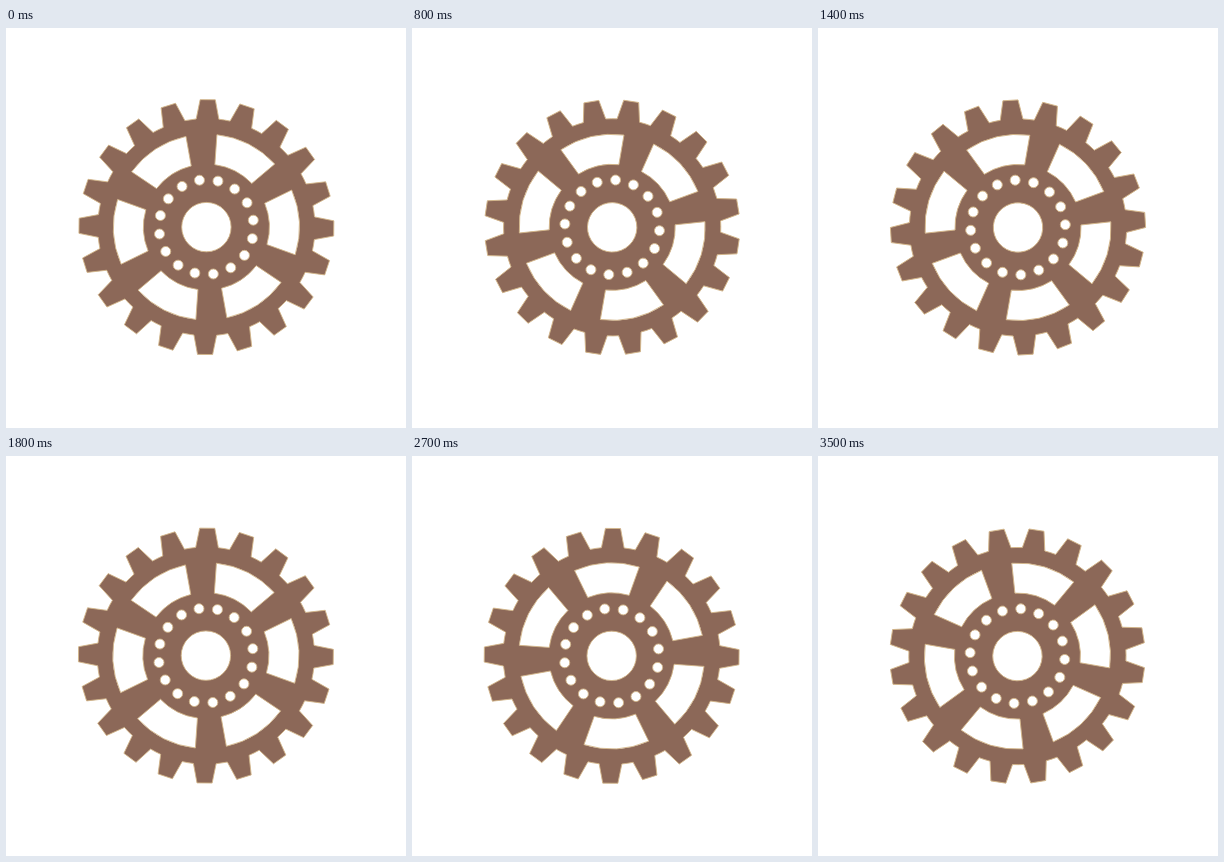
These frames come from a looping animation (400x400 px, 3.6 s). An HTML page:

```html
<!DOCTYPE html>
<html lang="en">
<head>
<meta charset="utf-8">
<title>Turning gear</title>
<style>
  html, body { margin: 0; width: 100%; height: 100%; overflow: hidden; background: #fff; }
  svg { display: block; width: 100vw; height: 100vh; }
</style>
</head>
<body>
<svg viewBox="0 0 400 400">
  <path id="gear" fill="#8c6858" fill-rule="evenodd" stroke="#d3b68a" stroke-width="0.9" stroke-linejoin="round"/>
</svg>
<script>
const LOOP = 3600, STEP = 100, STEPS = LOOP / STEP;
const TEETH = 20, SPOKES = 6, DOTS = 16;
const gear = document.getElementById('gear');

// Angles are in degrees, clockwise from the top.
function polar(radius, angle) {
  const a = angle * Math.PI / 180;
  return [radius * Math.sin(a), -radius * Math.cos(a)];
}
const point = (radius, angle) => polar(radius, angle).map(v => v.toFixed(2)).join(' ');

function arc(radius, angle, sweep) {
  return `A${radius} ${radius} 0 0 ${sweep} ${point(radius, angle)}`;
}

function circle(radius, x = 0, y = 0) {
  return `M${x - radius} ${y}a${radius} ${radius} 0 1 0 ${2 * radius} 0` +
    `a${radius} ${radius} 0 1 0 ${-2 * radius} 0Z`;
}

function repeat(count, offset, draw) {
  return Array.from({ length: count }, (_, i) => draw(offset + i * 360 / count)).join('');
}

function rim() {
  const root = 108.6, tip = 127.6, rootHalf = 6, tipHalf = 3.4, offset = 0.6;
  const teeth = repeat(TEETH, offset, a =>
    arc(root, a - rootHalf, 1) +
    `L${point(tip, a - tipHalf)}L${point(tip, a + tipHalf)}L${point(root, a + rootHalf)}`);
  return `M${point(root, offset - rootHalf)}${teeth}Z`;
}

function windowHole(angle) {
  const outer = 93, inner = 63, outerHalf = 20.4, innerHalf = 19.2;
  return `M${point(outer, angle - outerHalf)}${arc(outer, angle + outerHalf, 1)}` +
    `L${point(inner, angle + innerHalf)}${arc(inner, angle - innerHalf, 0)}Z`;
}

gear.setAttribute('d',
  rim() +
  repeat(SPOKES, 26.9, windowHole) +
  repeat(DOTS, -8.4, a => circle(5, ...polar(47.4, a))) +
  circle(24.7));

// The axle drifts slightly down and left over a turn.
function render(time) {
  const step = Math.floor((time % LOOP) / STEP);
  const turn = step / STEPS;
  gear.setAttribute('transform',
    `translate(${200.4 - turn} ${199.1 + turn}) rotate(${360 * turn})`);
}

const start = performance.now();
function tick() {
  render(performance.now() - start);
  requestAnimationFrame(tick);
}
tick();
</script>
</body>
</html>
```
